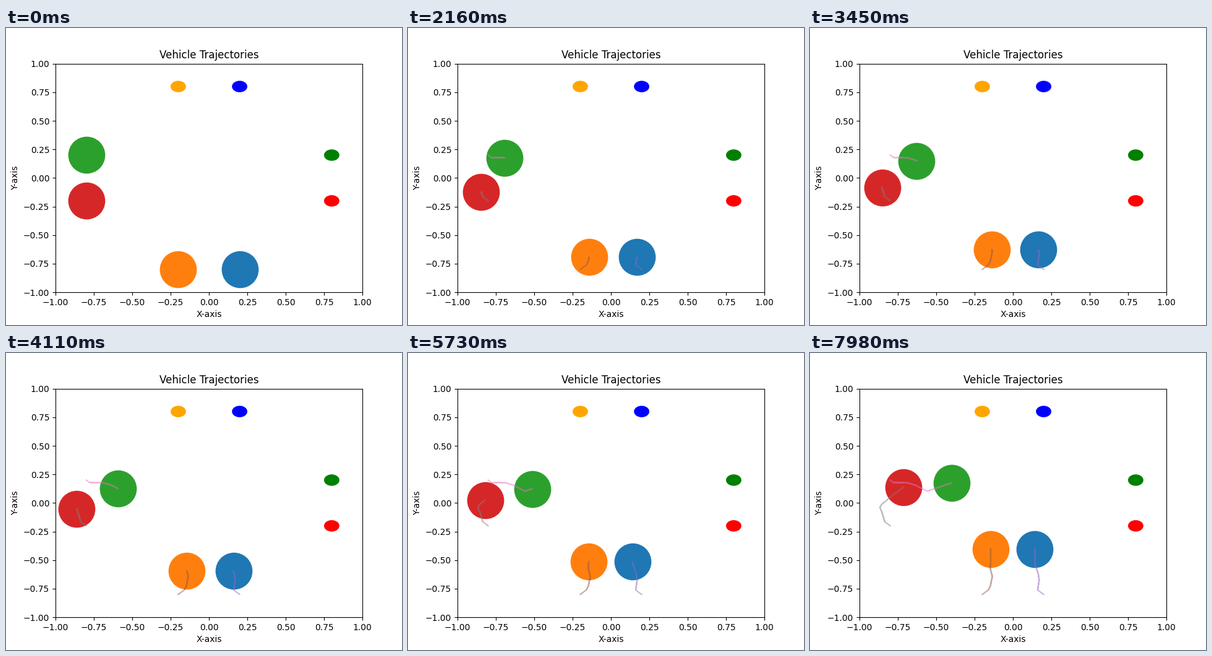
Animation, 640 px wide and 480 px high, one loop 8000 ms. Source, as a matplotlib script:

```python
import numpy as np
import matplotlib.pyplot as plt
from matplotlib.animation import FuncAnimation

FRAMES = 267
SPEED = 0.0015  # distance per axis and step
steps = np.arange(FRAMES)


def straight(start):
    return start + SPEED * steps


def steer(start, *turns):
    """Head for each (step, value) turn, always moving one fixed step up or down."""
    path = [start]
    for target in np.interp(steps, *zip((0, start), *turns))[1:]:
        path.append(path[-1] + (SPEED if target > path[-1] else -SPEED))
    return np.array(path)


paths = [
    (steer(0.2, (26, 0.161), (85, 0.171), (120, 0.165), (180, 0.142)),
     straight(-0.8)),
    (steer(-0.2, (27, -0.16), (50, -0.147), (105, -0.1345), (150, -0.148),
           (190, -0.1452)),
     straight(-0.8)),
    (straight(-0.8),
     steer(0.2, (14, 0.179), (75, 0.177), (108, 0.157), (160, 0.103),
           (266, 0.175))),
    (steer(-0.8, (23, -0.835), (115, -0.853), (146, -0.867), (162, -0.857),
           (212, -0.794), (266, -0.713)),
     steer(-0.2, (25, -0.163), (115, -0.085), (266, 0.139))),
]

fig, ax = plt.subplots(figsize=(6.4, 4.8), dpi=100)
ax.set(xlim=(-1, 1), ylim=(-1, 1), xlabel="X-axis", ylabel="Y-axis",
       title="Vehicle Trajectories")

for side, right, top in [(-0.2, "red", "orange"), (0.2, "green", "blue")]:
    ax.add_patch(plt.Circle((0.8, side), 0.05, fc=right))
    ax.add_patch(plt.Circle((side, 0.8), 0.05, fc=top))

vehicles = [ax.plot([], [], "o", color=f"C{i}", markersize=42)[0]
            for i in range(4)]
trails = [ax.plot([], [], color=f"C{i + 4}", alpha=0.5)[0] for i in range(4)]


def update(n):
    for vehicle, trail, (x, y) in zip(vehicles, trails, paths):
        vehicle.set_data([x[n]], [y[n]])
        trail.set_data(x[:n + 1], y[:n + 1])
    return vehicles + trails


anim = FuncAnimation(fig, update, frames=FRAMES, interval=30, repeat=True,
                     repeat_delay=0)
plt.show()
```
